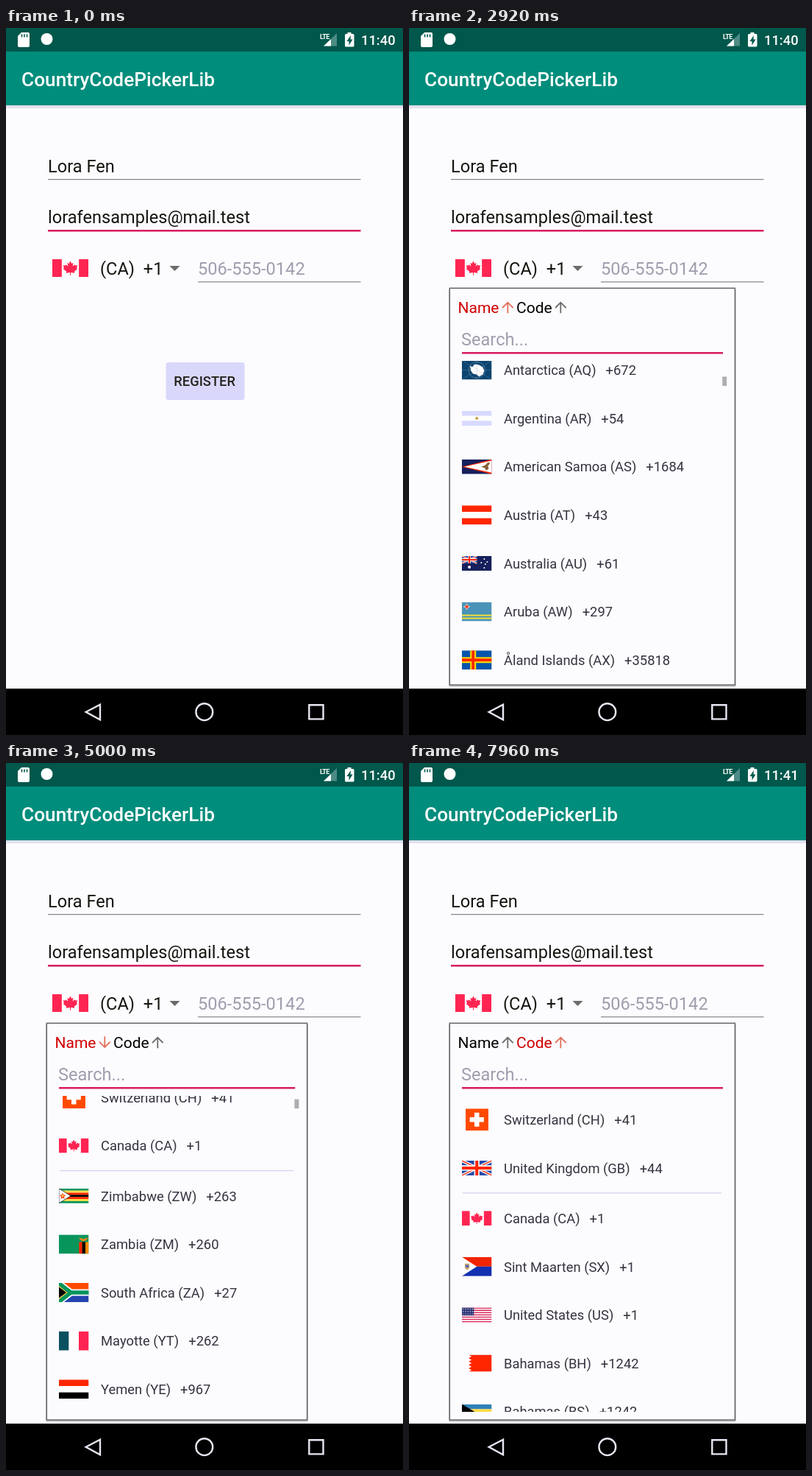
Write an HTML page that moves like this. It is 540 by 960 pixels and loops after 8000 ms.

```html
<!DOCTYPE html>
<html lang="en">
<head>
<meta charset="utf-8">
<title>Country code picker</title>
<style>
html, body { margin: 0; width: 100%; height: 100%; overflow: hidden; background: #fcfbfe; }
#stage { display: block; width: 100vw; height: 100vh; font-family: Roboto, sans-serif; }
.title { font-size: 26.25px; font-weight: 500; fill: #fff; }
.field { font-size: 23.6px; fill: #16150f; }
.hint { fill: #a09eae; }
.sort { font-size: 21px; }
.row { font-size: 18.375px; fill: #35333f; }
.button { font-size: 18.375px; font-weight: 500; fill: #25231c; }
.clock { font-size: 18.375px; font-weight: 500; fill: #fff; }
.arrow { fill: none; stroke-width: 1.8; }
</style>
</head>
<body>
<svg id="stage" viewBox="0 0 540 960"></svg>
<script>
const LOOP = 8000, OPEN = 640, TOP = 452, FIRST_ROW = 484.3, PITCH = 65.625;
const RED = '#ff2600', ROSE = '#ff2552', ORANGE = '#ff4900', NAVY = '#16205c',
      BLUE = '#2349a9', GREEN = '#07955c', TEAL = '#0a5060', GOLD = '#ffdb49',
      BLACK = '#000', WHITE = '#fff';
const PRIMARY = '#008d7c', PRIMARY_DARK = '#00574b', ACCENT = '#d81b60', LINE = '#868489';

const rect = (x, y, w, h, fill, more = '') =>
  `<rect x="${x}" y="${y}" width="${w}" height="${h}" fill="${fill}" ${more}/>`;
const path = (d, fill, more = '') => `<path d="${d}" fill="${fill}" ${more}/>`;
const stroke = (d, color, width) =>
  path(d, 'none', `stroke="${color}" stroke-width="${width}"`);
const dot = (x, y, r, fill) => `<circle cx="${x}" cy="${y}" r="${r}" fill="${fill}"/>`;
const ring = (x, y, r, color, width) =>
  `<circle cx="${x}" cy="${y}" r="${r}" fill="none" stroke="${color}" stroke-width="${width}"/>`;
const text = (x, y, cls, body, more = '') =>
  `<text x="${x}" y="${y}" class="${cls}" ${more}>${body}</text>`;

// Flags are drawn in a box 40 wide and h high.
const bands = (h, ...colors) => colors.map((c, i) =>
  rect(0, i * h / colors.length, 40, h / colors.length + .1, c)).join('');
const pales = (h, ...colors) => colors.map((c, i) =>
  rect(i * 40 / colors.length, 0, 40 / colors.length + .1, h, c)).join('');
const union = (w, h) => {
  const saltire = `M0 0L${w} ${h}M0 ${h}L${w} 0`, cross = `M${w / 2} 0V${h}M0 ${h / 2}H${w}`;
  return rect(0, 0, w, h, BLUE) + stroke(saltire, WHITE, h * .2) + stroke(saltire, RED, h * .07) +
    stroke(cross, WHITE, h * .36) + stroke(cross, RED, h * .2);
};
const leaf = path('M0-8L1.5-5 3.3-6 2.6-2 5-4 5.7-2.8 8-3 7 0 8 .8 4.3 4 4.8 5.6 .4 5V8H-.4V5L-4.8 5.6-4.3 4-8 .8-7 0-8-3-5.7-2.8-5-4-2.6-2-3.3-6-1.5-5z',
  ROSE, 'transform="translate(20 10)"');
const stars = (points, r) => points.map(([x, y]) => dot(x, y, r, WHITE)).join('');

const flags = {
  CA: [20, rect(0, 0, 40, 20, WHITE) + rect(0, 0, 10.5, 20, ROSE) + rect(29.5, 0, 10.5, 20, ROSE) + leaf],
  CH: [30, rect(5, 0, 30.5, 30, ORANGE) + stroke('M20 5.5V24.5M10.5 15H29.5', WHITE, 6.4)],
  GB: [20, union(40, 20)],
  US: [20, bands(20, ...Array.from({ length: 13 }, (_, i) => i % 2 ? WHITE : '#d82658')) +
    rect(0, 0, 16, 10.8, '#303878') +
    stars(Array.from({ length: 15 }, (_, i) => [1.8 + i % 5 * 3.1, 2 + (i / 5 | 0) * 3.3]), .6)],
  AD: [27, pales(27, TEAL, GOLD, ROSE) + path('M15 8h10v7q0 5-5 5t-5-5z', '#c87b24') + stroke('M17 11h6M17 15h6', '#e4b049', 1)],
  AE: [20, bands(20, '#007a68', WHITE, BLACK) + rect(0, 0, 10.5, 20, ORANGE)],
  AF: [27, pales(27, BLACK, RED, GREEN) + ring(20, 13.5, 5.5, WHITE, 1.6) + rect(17.5, 11, 5, 5, WHITE)],
  AG: [27, rect(0, 0, 40, 27, RED) + path('M0 0H40L20 27z', BLACK) + path('M6 9H34L28 17H12z', '#2379c0') + path('M12 17H28L20 27z', WHITE) + path('M14 9a6 5 0 0 1 12 0z', GOLD)],
  AI: [20, rect(0, 0, 40, 20, NAVY) + union(20, 10) + path('M27 5h8v6q-1 4-4 5-3-1-4-5z', WHITE) + dot(31, 9, 2, ORANGE)],
  AL: [28, rect(0, 0, 40, 28, RED) + path('M20 7l3-2 2 3 5-1-2 11-5-1-3 7-3-7-5 1-2-11 5 1 2-3z', BLACK)],
  AM: [20, bands(20, RED, BLUE, '#ffa500')],
  AO: [27, bands(27, RED, BLACK) + path('M18 7a7 7 0 1 1-2 12l1-1a6 6 0 1 0 1-10z', GOLD) + stroke('M15 12l10 8', GOLD, 1.5)],
  AQ: [26, rect(0, 0, 40, 26, '#0b4570') + stroke('M0 0L40 26M0 26L40 0M20 0V26M0 13H40', '#557ca0', .5) +
    ring(20, 13, 11, '#7796b2', .6) +
    path('M11 7l3 2 3-4 6 1 5 3 2 5-2 5-5 3-3-3-5-1-3-4z', WHITE) + stroke('M14 8l13 9M20 5v15', '#b8cce0', .6)],
  AR: [20, bands(20, '#d7d9ff', WHITE, '#d7d9ff') + dot(20, 10, 2, '#c1a04c')],
  AS: [20, rect(0, 0, 40, 20, NAVY) + path('M0 10L40 0V20z', RED) + path('M3 10L40 1.8V18.2z', WHITE) + path('M26 10l5-2 4-4 3 1-3 4 1 4-4 2-1-3z', '#8b6038')],
  AT: [26, bands(26, RED, WHITE, RED)],
  AU: [20, rect(0, 0, 40, 20, NAVY) + union(20, 10) + dot(10, 15, 2, WHITE) + stars([[30, 4], [26, 9], [34, 8], [31.5, 11], [30, 16]], 1)],
  AW: [26, rect(0, 0, 40, 26, '#4a93b8') + rect(0, 17, 40, 2, '#f3df36') + rect(0, 21, 40, 2, '#f3df36') + path('M6.5 2l1.2 3 3 1.2-3 1.2-1.2 3-1.2-3-3-1.2 3-1.2z', RED, 'stroke="#fff" stroke-width=".6"')],
  AX: [26, rect(0, 0, 40, 26, '#0655aa') + stroke('M15 0V26M0 13H40', '#ffd300', 8) + stroke('M15 0V26M0 13H40', RED, 3.6)],
  AZ: [20, bands(20, '#00a0c0', RED, GREEN) + dot(19, 10, 3, WHITE) + dot(20, 10, 2.4, RED)],
  ZW: [20, bands(20, GREEN, GOLD, RED, BLACK, RED, GOLD, GREEN) + path('M0 0L16 10 0 20z', WHITE, 'stroke="#000" stroke-width=".7"') + path('M5 6l1.2 2.7 3 .3-2.3 2 .7 3L5 12.4 2.4 14l.7-3L.8 9l3-.3z', RED) + dot(5, 10, 1.5, GOLD)],
  ZM: [26, rect(0, 0, 40, 26, GREEN) + rect(27, 10, 4.4, 16, RED) + rect(31.3, 10, 4.4, 16, BLACK) + rect(35.6, 10, 4.4, 16, '#ff8a00') + path('M26 4l5 1 2 1 2-1 5-1-4 4-3 1-3-1z', '#e38719')],
  ZA: [26, rect(0, 0, 40, 13, ORANGE) + rect(0, 13, 40, 13, '#2444b0') + stroke('M-3-2L16 13-3 28M16 13H41', WHITE, 9) + path('M0 0L16 13 0 26z', GOLD) + stroke('M-3-2L16 13-3 28M16 13H41', GREEN, 5.5) + path('M0 5.5L10 13 0 20.5z', BLACK)],
  YT: [26, pales(26, TEAL, WHITE, ROSE)],
  YE: [26, bands(26, RED, WHITE, BLACK)],
  XK: [28, rect(0, 0, 40, 28, BLUE) + path('M19 10l4 3 4 4-4 2-3 5-3-3-4-4 3-3z', '#d9a94d') + stars(Array.from({ length: 6 }, (_, i) => [10 + i * 4, 5.5 + Math.abs(i - 2.5) * .7]), 1)],
  WS: [20, rect(0, 0, 40, 20, ORANGE) + rect(0, 0, 20, 10, BLUE) + stars([[10, 2], [7, 5], [13, 4], [10, 8]], 1)],
  WF: [30, rect(0, 0, 40, 30, RED) + path('M22 15L18 6h9zL31 11v9zL27 25h-9zL13 20v-9z', WHITE) + rect(0, 0, 12, 9, WHITE) + rect(0, 0, 4, 8, BLUE) + rect(8, 0, 3, 8, RED)],
  VU: [24, rect(0, 0, 40, 12, RED) + rect(0, 12, 40, 12, '#3b9864') + stroke('M0 0L20 12 0 24M20 12H40', BLACK, 6) + path('M0 0L20 12 0 24z', BLACK) + stroke('M0 1L19 12 0 23M19 12H40', GOLD, 1.6) + ring(6, 12, 3, GOLD, 1.4)],
  VN: [26, rect(0, 0, 40, 26, RED) + path('M20 5l2 6h6l-5 4 2 6-5-4-5 4 2-6-5-4h6z', GOLD)],
  SX: [26, rect(0, 0, 40, 13, '#f02400') + rect(0, 13, 40, 13, '#1230b0') + path('M0 0L20 13 0 26z', WHITE) + path('M4 9h6v6l-3 3-3-3z', '#c6a070') + rect(5, 11, 4, 3, '#4868b0')],
  BH: [23, rect(8, 0, 32, 23, WHITE) + path('M40 0H9' + 'l4 2.3-4 2.3'.repeat(5) + 'H40z', RED)],
  BS: [20, bands(20, '#2f82b8', GOLD, '#2f82b8') + path('M0 0L17 10 0 20z', BLACK)]
};
const flag = (code, x, middle, scale = 1) => {
  const [h, art] = flags[code];
  return `<svg x="${x}" y="${middle - h * scale / 2}" width="${40.5 * scale}" height="${h * scale}" viewBox="0 0 40 ${h}" preserveAspectRatio="none">${art}</svg>`;
};

const lists = [
  { pinned: 4, right: 443.8, rows: `Canada CA 1|Switzerland CH 41|United Kingdom GB 44|United States US 1|Andorra AD 376|United Arab Emirates AE 971|Afghanistan AF 93|Antigua and Barbuda AG 1|Anguilla AI 1|Albania AL 355|Armenia AM 374|Angola AO 244|Antarctica AQ 672|Argentina AR 54|American Samoa AS 1684|Austria AT 43|Australia AU 61|Aruba AW 297|Åland Islands AX 35818|Azerbaijan AZ 994` },
  { pinned: 4, right: 410, rows: `United States US 1|United Kingdom GB 44|Switzerland CH 41|Canada CA 1|Zimbabwe ZW 263|Zambia ZM 260|South Africa ZA 27|Mayotte YT 262|Yemen YE 967|Kosovo XK 383|Samoa WS 685|Wallis And Futuna WF 681|Vanuatu VU 678|Vietnam VN 84` },
  { pinned: 2, right: 443.8, rows: `Switzerland CH 41|United Kingdom GB 44|Canada CA 1|Sint Maarten SX 1|United States US 1|Bahamas BH 1242|Bahamas BS 1242` }
];
const drawList = ({ pinned, right, rows }) => `<g class="list">` +
  rows.split('|').map((row, i) => {
    const [, name, code, dial] = row.match(/(.+) (\w+) (\d+)/);
    const y = FIRST_ROW + i * PITCH + (i >= pinned ? 2.6 : 0);
    return flag(code, 72, y) +
      text(129, y + 6.8, 'row', `${name} (${code})<tspan dx="13">+${dial}</tspan>`);
  }).join('') +
  rect(73, 452 + pinned * PITCH, right - 92, 1.3, '#d3d2ee') + '</g>';

const arrow = (id, x) => `<g transform="translate(${x} 379.3)">` +
  `<path id="${id}" class="arrow" d="M0 8V-6.6M-7.3 .7L0-6.6 7.3 .7"/></g>`;

const statusBar = rect(0, 0, 540, 32, PRIMARY_DARK) +
  path('M21 6H30q2 0 2 2V24q0 2-2 2H18q-2 0-2-2V11z', WHITE) +
  stroke('M21.5 8.5v4M25 8.5v4M28.5 8.5v4', PRIMARY_DARK, 1.6) + dot(55.5, 15, 8, WHITE) +
  path('M450 7V24.5H432z', '#4d8b84') + path('M442 15V24.5H432z', WHITE) +
  text(427, 15, 'lte', 'LTE', 'font-size="9" font-weight="700" letter-spacing="-.6" fill="#fff"') +
  path('M464.5 8V6h5v2H472q1.5 0 1.5 1.5V24q0 1.5-1.5 1.5H462.5q-1.5 0-1.5-1.5V9.5q0-1.5 1.5-1.5z', WHITE) +
  path('M469 10l-5.5 8h3v5.5l5-8h-3z', PRIMARY_DARK) +
  text(483, 22.5, 'clock', '11:40', 'id="clock"');

const form = rect(0, 105, 540, 4, '#e2e1ee') + rect(0, 32, 540, 73, PRIMARY) +
  text(21, 78.5, 'title', 'CountryCodePickerLib') +
  text(57, 195.7, 'field', 'Lora Fen') + rect(57, 205, 425.5, 1.2, LINE) +
  text(57, 265.4, 'field', 'lorafensamples@mail.test') + rect(57, 274, 425.5, 2.5, ACCENT) +
  flag('CA', 63, 326, 1.21) +
  text(128, 335, 'field', '(CA)&#160;&#160;+1') + path('M222.5 323H236.5L229.5 330z', '#6c6b6a') +
  text(261, 335, 'field hint', '506-555-0142') + rect(261, 344.2, 221.5, 1.2, LINE) +
  rect(217.5, 454, 107, 51, '#d9d8fb', 'rx="3"') + text(228.3, 485.7, 'button', 'REGISTER');

const popup = `<g id="popup">` +
  rect(54, 354, 391, 540.5, '#000', 'class="frame" opacity=".22" rx="2"') +
  rect(55.3, 353.3, 388, 538.7, '#fcfbfe', 'class="frame" stroke="#66646a" stroke-width="1.5"') +
  text(66.5, 387, 'sort', 'Name', 'id="name"') + arrow('nameArrow', 134.3) +
  text(146, 387, 'sort', 'Code', 'id="code"') + arrow('codeArrow', 206.3) +
  text(71, 431.3, 'field hint', 'Search...') + rect(72, 440, 355, 2.5, ACCENT, 'id="underline"') +
  rect(72, 405.5, 2, 32, ACCENT, 'id="cursor"') +
  `<clipPath id="view">${rect(56, TOP, 388, 429, WHITE)}</clipPath>` +
  `<g clip-path="url(#view)">${lists.map(drawList).join('')}</g>` +
  rect(426, TOP, 6, 12.5, '#afadaf', 'id="thumb"') + '</g>';

const nav = rect(0, 897, 540, 63, BLACK) +
  stroke('M108.7 928.7L128 918.7V939.2z', '#e8e6f2', 2.4) +
  ring(269.8, 928.7, 11.4, '#e8e6f2', 2.4) +
  stroke('M412.3 919.2H431.5V938.4H412.3z', '#e8e6f2', 2.4);

const stage = document.getElementById('stage');
stage.innerHTML = rect(0, 0, 540, 960, '#fcfbfe') + form + statusBar + popup + nav;

const $ = id => document.getElementById(id);
const groups = stage.querySelectorAll('.list'), frames = stage.querySelectorAll('.frame');
const set = (node, attrs) => { for (const k in attrs) node.setAttribute(k, attrs[k]); };

const scrollSteps = [[1450, 0], [2000, 420], [2120, 430], [2700, 810], [2920, 810], [3380, 0],
  [4700, 0], [5000, 161.6], [5250, 300], [5600, 442.3], [5900, 442.3], [6450, 0]];
const thumbSteps = [[3700, 1], [3950, 0], [4650, 0], [4700, 1], [6900, 1], [7150, 0]];

function track(steps, t) {
  const next = steps.findIndex(([time]) => time > t);
  if (next === 0) return steps[0][1];
  if (next < 0) return steps[steps.length - 1][1];
  const [t0, a] = steps[next - 1], [t1, b] = steps[next], p = (t - t0) / (t1 - t0);
  return a + (b - a) * p * p * (3 - 2 * p);
}

function render(t) {
  const mode = t < 4100 ? 0 : t < 7000 ? 1 : 2, byName = mode < 2;
  const scroll = track(scrollSteps, t), right = lists[mode].right;
  set($('popup'), { opacity: Math.max(0, Math.min(1, (t - OPEN) / 120)) });
  groups.forEach((group, i) => set(group, {
    display: i === mode ? 'inline' : 'none', transform: `translate(0 ${-scroll})`
  }));
  set(frames[0], { width: right + 1 - 54 });
  set(frames[1], { width: right - .4 - 55.3 });
  set($('underline'), { width: right - 16.8 - 72 });
  set($('thumb'), { x: right - 17.6, y: TOP + .4 + scroll * .026, opacity: track(thumbSteps, t) });
  set($('cursor'), { opacity: t % 1000 >= 170 && t % 1000 < 670 ? 1 : 0 });
  set($('name'), { fill: byName ? '#d00000' : '#000' });
  set($('code'), { fill: byName ? '#000' : '#d00000' });
  set($('nameArrow'), { stroke: byName ? '#e2705a' : '#6c6b6a', transform: mode === 1 ? 'scale(1 -1)' : '' });
  set($('codeArrow'), { stroke: byName ? '#6c6b6a' : '#e2705a' });
  $('clock').textContent = t < 6600 ? '11:40' : '11:41';
}

const start = performance.now();
(function tick() {
  render((performance.now() - start) % LOOP);
  requestAnimationFrame(tick);
})();
</script>
</body>
</html>
```
